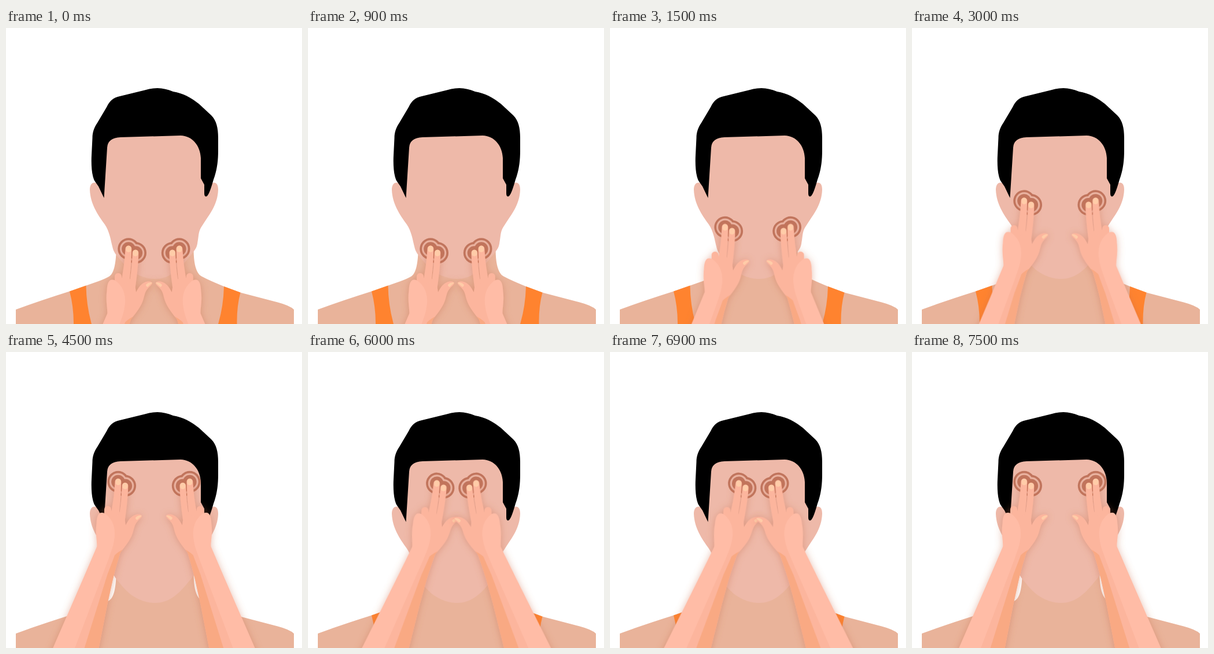
An HTML page that plays this animation: 512x512 px, repeating every 8000 ms.

```html
<!DOCTYPE html>
<html lang="en">
<head>
<meta charset="utf-8">
<title>Face massage</title>
<style>
  html, body { margin: 0; width: 100%; height: 100%; overflow: hidden; background: #fff; }
  svg { display: block; width: 100vw; height: 100vh; }
</style>
</head>
<body>
<svg viewBox="0 0 512 512">
  <defs>
    <filter id="soft" filterUnits="userSpaceOnUse" x="-170" y="-40" width="260" height="400">
      <feDropShadow dx="0" dy="1" stdDeviation="6.5" flood-color="#c8694a" flood-opacity=".43"/>
    </filter>

    <g id="rings">
      <g fill="#c1755d"><circle r="18.7"/><circle cx="12.3" cy="7" r="18.7"/></g>
      <g fill="#eab3a2"><circle r="15"/><circle cx="12.3" cy="7" r="15"/></g>
      <g fill="#c1755d"><circle r="11.8"/><circle cx="12.3" cy="7" r="11.8"/></g>
    </g>

    <g id="hand" filter="url(#soft)">
      <!-- palm, thumb and forearm -->
      <path fill="#fcb59d" d="M-13 50L2 52L11 62L13 75C17 67 23 58 32 56.5C37 55.5 41 57 41 59.5C41 62 36 65 33 69C27 76 28 82 24 92C20 102 12 112 4 122Q-3 144 -9 168L-18.5 211L-33.5 288L-43 330H-125L-36 113L-24 60Z"/>
      <path fill="#f9a983" d="M-6 127Q-1 122 8 117Q4 121 3 125Q-3 144 -9 168L-18.5 211L-33.5 288L-43 330H-72L-58.5 288L-18.5 160Q-8 133 -6 127Z"/>
      <!-- fingers -->
      <path fill="#fcb59d" d="M-5.5 -.3A5.3 5.3 0 0 1 5.3 -.3Q5 28 1.5 57L-14 62Q-7 30 -5.500 -.3Z"/>
      <path fill="#fcb59d" d="M6.7 6.7A5.3 5.3 0 0 1 17.3 6.7Q17 30 11.5 68L1 62Q6 34 6.7 6.7Z"/>
      <rect x="-24" y="42" width="12" height="26" rx="5.7" fill="#fcb59d"/>
      <!-- back of the hand -->
      <path fill="#ffbca6" d="M-37.5 72C-37 60 -34 53.5 -29 53.5C-24 53.5 -22 55 -17 60C-7 70 -4 86 -7 101C-9 115 -13 122 -16 132L-75 288L-92 330H-132L-113 288L-59.5 165L-36.8 112C-36 104 -40 90 -37.5 72Z"/>
      <!-- nails -->
      <g fill="#ffcca8">
        <rect x="-4.6" y="-5.2" width="9.2" height="11" rx="4.300"/>
        <rect x="7.4" y="1.8" width="9.2" height="11" rx="4.300"/>
        <path d="M30 62Q34 57.5 40 58Q41 59.5 38 61.5L33 66Q30 65 30 62Z"/>
      </g>
    </g>
  </defs>

  <rect width="512" height="512" fill="#fff"/>
  <path fill="#e9b39a" d="M17 512V487Q59 471.500 110 455.5L160 438Q171 434 178 430C187 425 190 408 191 380H324.500C324.500 402 327 420 336 428Q343 433 377 447L405 457.5L470 474.500Q491 480 498 487V512Z"/>
  <g fill="#ff832f">
    <path d="M110 455.5L138.5 445.5Q139 480 148 512H117Q117 482 110 455.5Z"/>
    <path d="M377 447L405.5 457.5Q399 482 399.5 512H367Q376 482 377 447Z"/>
  </g>
  <path fill="#eeb9a9" d="M156 268C149 266 145 271 145 280C146 304 158 322 171 340C179 352 181 366 184 378C186 388 191 393 197 400C214 423 236 434 258 434C284 434 300 416 312 402C318 395 322 390 325 386C329 381 330 378 331 373C334 358 332 352 340 341C352 322 366 306 367 280C367 269 363 266 356 268L340 180H165Z"/>
  <path d="M149.500 190C149.500 181 152 173 158 164L174 137Q181 121.500 195 118.500L240 107.5Q250 104 262 104Q276 104.500 289 110C306 113 320 120 334 131.500L355 151C364 160 367 173 367 190V212C367 230 365 246 359 262C356 272 352 287 347.5 291Q343 293 343 286V271L337 260V225C336 203 322 186.500 302 186L198 189Q176 190 175 207L169.5 294L160 274Q155 267 153 264C149 256 147 240 148 220Z"/>
  <g id="left"><use href="#rings"/><use href="#hand"/></g>
  <g id="right"><use href="#rings"/><use href="#hand"/></g>
</svg>
<script>
  const LOOP = 8000, HOLD = 1500;
  // left fingertip x, right fingertip x, y, tilt in degrees
  const temples = [194, 317.8, 224.5, 0];
  const poses = [
    [212, 299.8, 382, 0],
    [199, 312.3, 344.5, -0.8],
    [194, 317.5, 299, -0.5],
    temples,
    [222.8, 290.8, 227.3, 3],
    temples
  ];
  const left = document.getElementById('left');
  const right = document.getElementById('right');

  function draw(t) {
    const [lx, rx, y, tilt] = poses[Math.floor((t % LOOP) / HOLD)];
    left.setAttribute('transform', `translate(${lx} ${y}) rotate(${tilt})`);
    right.setAttribute('transform', `translate(${rx} ${y}) scale(-1 1) rotate(${tilt})`);
  }

  const start = performance.now();
  function tick() {
    draw(performance.now() - start);
    requestAnimationFrame(tick);
  }
  tick();
</script>
</body>
</html>
```
